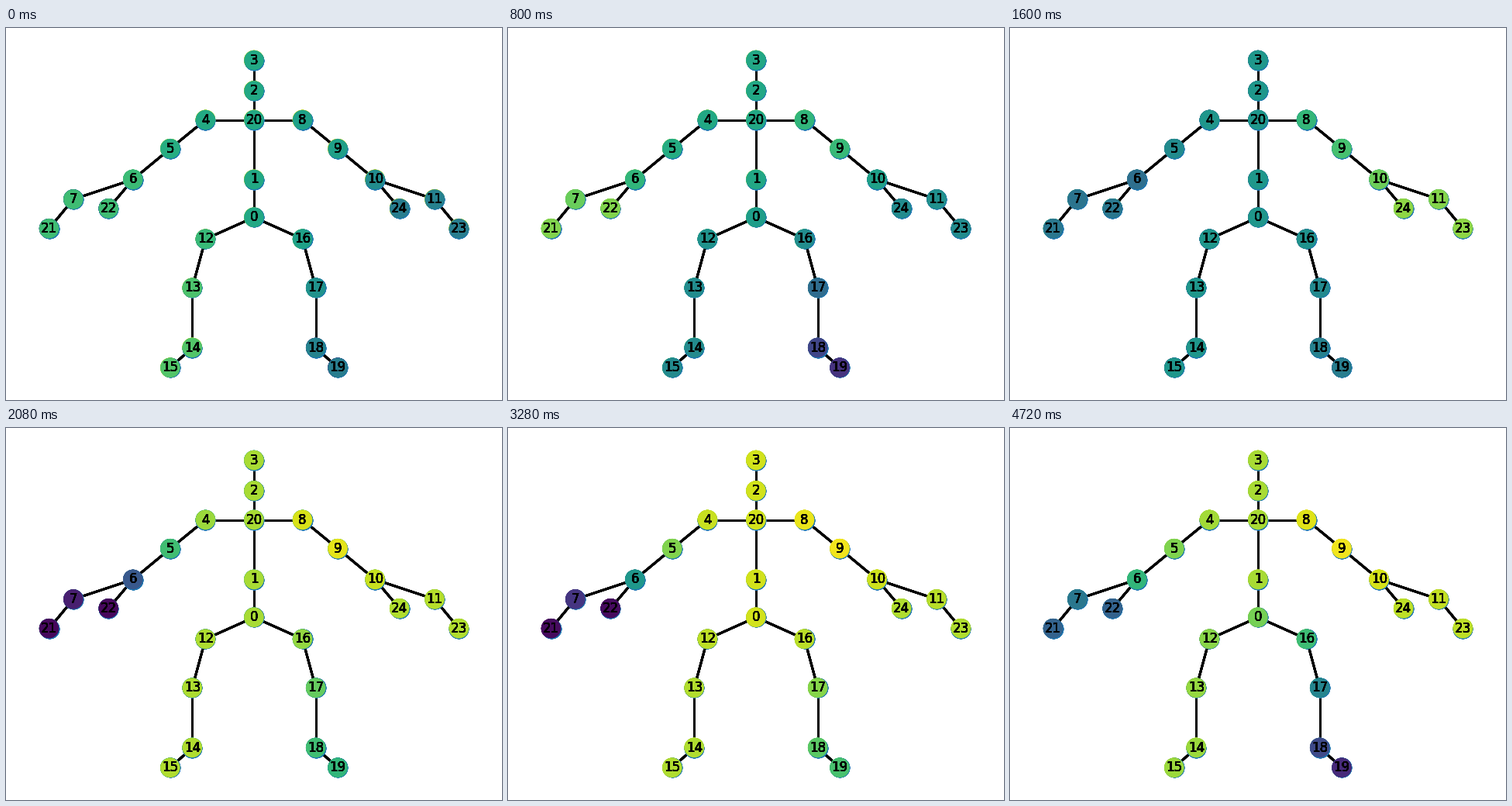
A matplotlib script for the animation above (4800 ms loop, 640x480 px).

```python
import numpy as np
import matplotlib.pyplot as plt
from matplotlib.animation import FuncAnimation
from matplotlib.collections import LineCollection

W, H, DPI = 640, 480, 100
FRAMES, STEP_MS = 60, 80
LAYERS = 10  # every drawing is stacked, which hardens its edges

# Spine and left half of the body in pixels; the right half is mirrored.
JOINTS = {
    3: (320, 41.6), 2: (320, 81), 20: (320, 118.5), 1: (320, 195.5), 0: (320, 244.3),
    4: (257.4, 118.5), 5: (211.9, 155.7), 6: (163.8, 195.5), 7: (86.9, 221),
    21: (55.6, 258.7), 22: (132.3, 232.8),
    12: (257.4, 272.3), 13: (240.3, 335.3), 14: (240.3, 412.5), 15: (211.9, 438.3),
}
MIRROR = {4: 8, 5: 9, 6: 10, 7: 11, 21: 23, 22: 24, 12: 16, 13: 17, 14: 18, 15: 19}
for left, right in MIRROR.items():
    x, y = JOINTS[left]
    JOINTS[right] = (W - x, y)

LIMBS = [(3, 2, 20, 1, 0), (20, 4, 5, 6, 7, 21), (6, 22), (0, 12, 13, 14, 15)]
BONES = [bone for limb in LIMBS for bone in zip(limb, limb[1:])]
BONES += [(MIRROR.get(a, a), MIRROR[b]) for a, b in BONES if b in MIRROR]

# Activity (0..1) of a few leading joints at the key moments.
KEYS = [0, 7, 14, 26, 41, 49, 59]
LEADERS = {
    20: [.60, .90, .19, .87, .93, .92, .87],
    0: [.60, .83, .18, .87, .93, .90, .79],
    6: [.68, .81, .45, .27, .53, .77, .66],
    21: [.69, .84, .77, .02, .03, .50, .31],
    9: [.56, .84, .45, .96, .98, .99, .98],
    23: [.42, .25, .78, .88, .88, .89, .90],
    14: [.73, .70, .17, .88, .88, .88, .85],
    19: [.42, .12, .18, .66, .71, .47, .12],
}
# Joints that simply copy a leader.
FOLLOW = {1: 20, 2: 20, 3: 20, 22: 21, 24: 23, 15: 14}


def ease_in(t):
    return t ** 3


def ease_out(t):
    return 1 - (1 - t) ** 2


def smooth(t):
    return t * t * (3 - 2 * t)


# Joints between two leaders blend from the first one to the last.
BLENDS = [
    ((20, 4, 5, 6), ease_in), ((6, 7, 21), ease_out),
    ((20, 8, 9), ease_out), ((9, 10, 11, 23), ease_out),
    ((0, 12, 13, 14), ease_out), ((0, 16, 17, 18, 19), smooth),
]

order = sorted(JOINTS)
points = np.array([JOINTS[j] for j in order])


def levels_at(frame):
    level = {j: np.interp(frame, KEYS, track) for j, track in LEADERS.items()}
    for chain, ease in BLENDS:
        start, end = level[chain[0]], level[chain[-1]]
        for i, joint in enumerate(chain[1:-1], 1):
            level[joint] = start + (end - start) * ease(i / (len(chain) - 1))
    level.update({j: level[leader] for j, leader in FOLLOW.items()})
    return np.array([level[j] for j in order])


levels = [levels_at(i) for i in range(FRAMES)]

fig = plt.figure(figsize=(W / DPI, H / DPI), dpi=DPI, facecolor="white")
ax = fig.add_axes([0, 0, 1, 1])
ax.set(xlim=(0, W), ylim=(H, 0))
ax.axis("off")

segments = [(JOINTS[a], JOINTS[b]) for a, b in BONES]
ax.add_collection(LineCollection(segments * LAYERS, colors="black",
                                 linewidths=2, zorder=1))

# Blue discs under the coloured ones show as a thin rim.
discs = []
for _ in range(LAYERS):
    ax.scatter(*points.T, s=300, c="#1f78b4", linewidths=1, zorder=2)
    discs.append(ax.scatter(*points.T, s=300, c=levels[0], cmap="viridis",
                            vmin=0, vmax=1, linewidths=1, zorder=2))
    for joint, (x, y) in JOINTS.items():
        ax.text(x, y, str(joint), fontsize=12, family="DejaVu Sans",
                ha="center", va="center", color="black", zorder=3)


def draw(frame):
    # Lower layers keep the colours of the preceding moments.
    for age, disc in enumerate(reversed(discs)):
        disc.set_array(levels[(frame - age) % FRAMES])
    return discs


anim = FuncAnimation(fig, draw, frames=FRAMES, interval=STEP_MS,
                     repeat=True, repeat_delay=0, blit=False)
plt.show()
```
